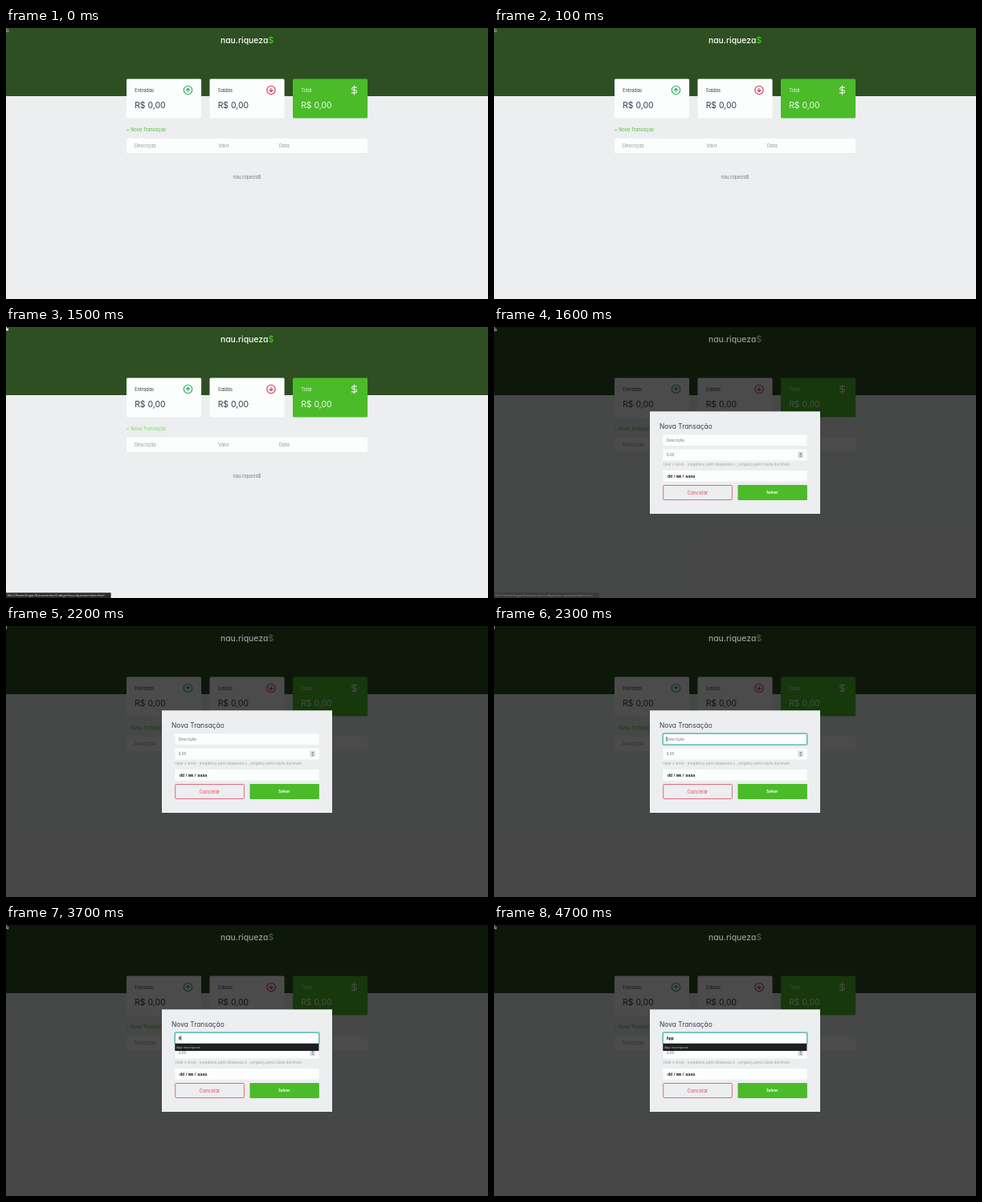
Write an HTML page that moves like this. It is 600 px wide and 338 px high and loops after 5.2 s.

```html
<!DOCTYPE html>
<html lang="pt-BR">
<head>
<meta charset="utf-8">
<title>Controle de transações</title>
<style>
  html, body { margin: 0; width: 100%; height: 100%; overflow: hidden; background: #eceeef; }
  svg { display: block; width: 100%; height: 100%; }
  text { font: 5.6px Inter, sans-serif; font-feature-settings: "cv11"; white-space: pre; }
  .logo { font-size: 10.4px; font-weight: 500; text-anchor: middle; }
  .amount { font-size: 10.4px; }
  .title { font-size: 8.4px; }
  .help { font-size: 4.55px; }
  .field { font-family: "Noto Sans", sans-serif; font-size: 4.9px; }
  .small { font-family: "Noto Sans", sans-serif; font-size: 4px; }
  .mono { font-family: "Noto Sans Mono", monospace; font-size: 5px; font-weight: 700; }
  .mid { text-anchor: middle; }
  .line { fill: none; stroke-width: 1.1; stroke-linecap: round; stroke-linejoin: round; }
</style>
</head>
<body>
<svg viewBox="0 0 600 338">
  <rect width="600" height="338" fill="#eceeef"/>
  <rect width="600" height="85" fill="#2d4f22"/>
  <g id="cards"></g>
  <text id="link" x="150" y="129">+ Nova Transação</text>
  <rect x="150" y="137.8" width="300" height="18.2" rx="1.5" fill="#fcfdfd"/>
  <g fill="#929496">
    <text x="160" y="148.8">Descrição</text>
    <text x="264" y="148.8">Valor</text>
    <text x="340" y="148.8">Data</text>
  </g>
  <text class="mid" x="300" y="188" fill="#75787c">nau.riqueza$</text>
  <rect id="shade" width="600" height="338" fill="#000" fill-opacity=".7"/>
  <text id="logo" class="logo" x="300" y="18.7">nau.riqueza<tspan id="sign">$</tspan></text>

  <g id="modal">
    <rect x="194" y="105.3" width="212" height="127.7" fill="#eceeef"/>
    <text class="title" x="206" y="126.7" fill="#363f52">Nova Transação</text>
    <g fill="#fcfdfd">
      <rect x="210.3" y="134.2" width="179.4" height="13.8" rx="1"/>
      <rect x="210.3" y="152.6" width="179.4" height="13.8" rx="1"/>
      <rect x="210.3" y="179" width="179.4" height="13.8" rx="1"/>
    </g>
    <g id="focus" fill="none">
      <rect x="209.9" y="133.8" width="180.2" height="14.6" rx="1.4" stroke="#8fd3cc" stroke-width="1.2"/>
      <rect x="210.3" y="134.2" width="179.4" height="13.8" rx="1" stroke="#2fa59b" stroke-width=".8"/>
    </g>
    <text id="hint" class="field" x="214.7" y="142.9" fill="#777a7c">Descrição</text>
    <text id="typed" class="mono" x="214.8" y="142.9" fill="#222"></text>
    <rect id="caret" y="138" width=".6" height="6" fill="#111"/>
    <text class="field" x="214.7" y="161.3" fill="#777a7c">0,00</text>
    <rect x="378.4" y="155.6" width="6.6" height="7.8" rx="1" fill="#dcdedf"/>
    <path d="M380.2 158.7l1.5-1.7 1.5 1.7zM380.2 160.4l1.5 1.7 1.5-1.7z" fill="#666"/>
    <text class="help" x="210.4" y="172.6" fill="#9fa1a3">Usar o sinal - (negativo) para despesas e , (vírgula) para casas decimais</text>
    <g fill="#222">
      <text class="mono" x="216" y="187.7">dd</text>
      <text class="mono" x="223" y="187.7">/</text>
      <text class="mono" x="227" y="187.7">mm</text>
      <text class="mono" x="234" y="187.7">/</text>
      <text class="mono" x="238.2" y="187.7">aaaa</text>
    </g>
    <rect x="210.7" y="197.5" width="85.7" height="18" rx="1.2" fill="none" stroke="#de4a67" stroke-width=".8"/>
    <text class="mid" x="253.5" y="208.6" fill="#de4a67" style="font-size:5.9px">Cancelar</text>
    <rect x="303.5" y="197.1" width="86.4" height="18.8" rx="1.2" fill="#4bbb29"/>
    <text class="field mid" x="346.5" y="208.3" fill="#fff" style="font-size:4.7px;font-weight:600">Salvar</text>
    <g id="suggest">
      <rect x="210.3" y="148" width="179.2" height="9" fill="#1e1f21"/>
      <text class="small" x="212.2" y="154" fill="#c4c6c8">App nauriqueza</text>
    </g>
  </g>

  <g id="status">
    <rect y="331.4" width="130.6" height="6.6" fill="#26282a"/>
    <text class="small" x="1.5" y="336.2" fill="#e4e6e8">file:///home/lugar/Documentos/Codigo/nau-riquezas/index.html</text>
  </g>

  <path id="arrow" d="M.3.2L.4 4.6 1.4 3.7 2.2 5.4 3 5 2.2 3.4 3.4 3.2z" fill="#333" stroke="#ddd" stroke-width=".5"/>
  <path id="hand" d="M0 0H1V1.6L3 2.1V4.4H.3L0 3.6z" fill="#eee"/>
  <path id="beam" d="M0 .3H1.2M.5 .3V3M0 3H1.2" fill="none" stroke="#ddd" stroke-width=".6"/>
</svg>
<script>
const LOOP = 5200;
const $ = id => document.getElementById(id);
const show = (id, on) => $(id).setAttribute("display", on ? "inline" : "none");
const fill = (id, color) => $(id).setAttribute("fill", color);

const ring = '<circle r="5.2"/>';
const cards = [
  { x: 150, label: "Entradas", ink: "#343a4a", back: "#fcfdfd", stroke: "#22ad5c",
    icon: ring + '<path d="M0 2.3V-2.2M-2.1 0L0-2.2 2.1 0"/>' },
  { x: 253.5, label: "Saídas", ink: "#343a4a", back: "#fcfdfd", stroke: "#d03a58",
    icon: ring + '<path d="M0-2.3V2.2M-2.1 0L0 2.2 2.1 0"/>' },
  { x: 357, label: "Total", ink: "#f4fbf1", back: "#4bbb29", stroke: "#eef9ea",
    icon: '<path d="M0-5.4V5.4M3-3.4H-1.2A1.7 1.7 0 0 0-1.2 0H1.3A1.7 1.7 0 0 1 1.3 3.4H-3.2"/>' }
];
$("cards").innerHTML = cards.map(c => `
  <g transform="translate(${c.x} 63.6)" fill="${c.ink}">
    <rect width="93.1" height="48.8" rx="1.5" fill="${c.back}"/>
    <text x="10.3" y="16.2">${c.label}</text>
    <text class="amount" x="10.2" y="36.8">R$ 0,00</text>
    <g class="line" transform="translate(76.5 13.9)" stroke="${c.stroke}">${c.icon}</g>
  </g>`).join("");

function typedAt(t) {
  return "App".slice(0, t < 3400 ? 0 : t < 3900 ? 1 : t < 4000 ? 2 : 3);
}

function render(t) {
  const within = (from, to) => t >= from && t < to;
  const open = t >= 1600;
  const hover = within(1300, 1600);
  const typed = typedAt(t);

  show("shade", open);
  show("modal", open);
  fill("logo", open ? "#999d97" : "#fff");
  fill("sign", open ? "#4a5a45" : "#4bc82a");
  fill("link", hover ? "#5fec3c" : "#4bc32a");

  show("status", within(1400, 1700));
  $("status").setAttribute("opacity", open ? 0.45 : 1);

  show("focus", t >= 2300);
  show("caret", within(2300, 4700));
  $("caret").setAttribute("x", 214.6 + typed.length * 3);
  show("hint", !typed);
  $("typed").textContent = typed;
  show("suggest", t >= 3500);

  const beam = within(2200, 3600);
  show("hand", hover);
  show("beam", beam);
  show("arrow", !hover && !beam);
}

const start = performance.now();
function tick() {
  render((performance.now() - start) % LOOP);
  requestAnimationFrame(tick);
}
tick();
</script>
</body>
</html>
```
